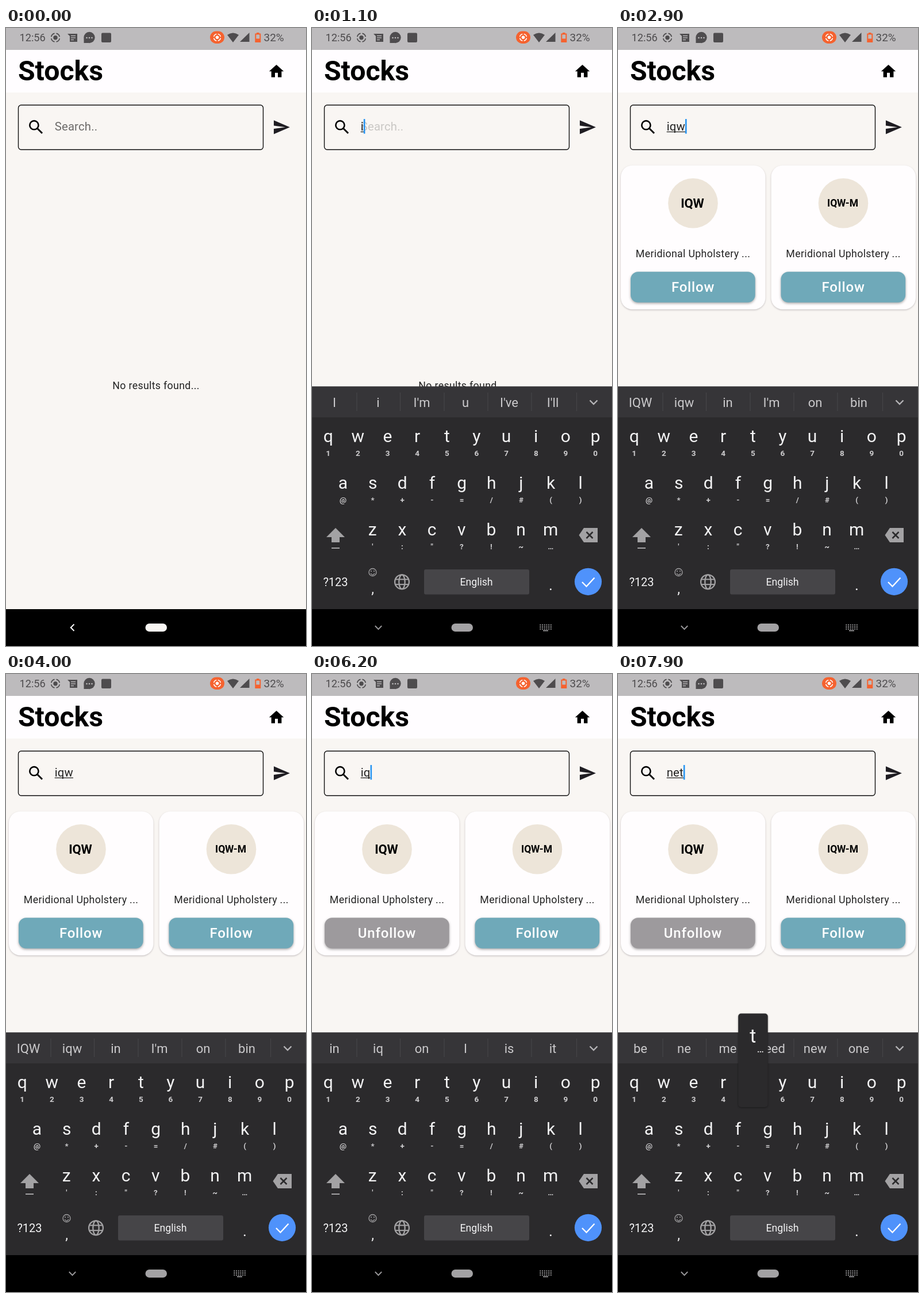
Animation, 522 px wide and 1073 px high, one loop 8000 ms. Source, as an HTML page with a canvas:

```html
<!DOCTYPE html>
<html lang="en">
<head>
<meta charset="utf-8">
<title>Stocks</title>
<style>
html, body { margin: 0; width: 100%; height: 100%; overflow: hidden; background: #f9f6f3; }
canvas { display: block; width: 522px; height: 1073px; }
</style>
</head>
<body>
<canvas id="stage" width="522" height="1073"></canvas>
<script>
const c = document.getElementById('stage').getContext('2d');
const LOOP = 8000, STEP = 100;

// [time, text in the search field]
const edits = [
  [300, ''], [1000, 'i'], [1300, 'iq'], [1500, 'iqw'], [5600, 'iqw'], [6100, 'iq'],
  [6300, 'i'], [6500, ''], [7000, 'n'], [7300, 'ne'], [7900, 'net']
];
const hints = {
  i: ['I', 'i', "I'm", 'u', "I've", "I'll"],
  iq: ['in', 'iq', 'on', 'I', 'is', 'it'],
  iqw: ['IQW', 'iqw', 'in', "I'm", 'on', 'bin'],
  n: ['in', 'n', 'no', 'on', 'not', 'and'],
  ne: ['be', 'ne', 'me', 'need', 'new', 'one']
};
const startHints = [['Limits', 51], ['Lukita', 151], ['Lakota', 254], ['Limitations', 382]];
const rows = [
  { keys: 'qwertyuiop', marks: '1234567890', x: 28.2, y: 710 },
  { keys: 'asdfghjkl', marks: '@*+-=/#()', x: 54, y: 791 },
  { keys: 'zxcvbnm', marks: "':\"?!~…", x: 105.3, y: 872 }
];
const KEY_W = 51.65, PANEL = '#2b2a2c';

const clamp = v => Math.max(0, Math.min(1, v));
const lastEdit = t => edits.filter(e => e[0] <= t).pop() || [0, ''];
const mix = (a, b, p) => `rgb(${a.map((v, i) => Math.round(v + (b[i] - v) * p))})`;

function text(s, x, y, size, color, { weight = 400, align = 'center', spacing = 0 } = {}) {
  c.font = `${weight} ${size}px Roboto, sans-serif`;
  c.letterSpacing = spacing + 'px';
  c.textAlign = align;
  c.fillStyle = color;
  c.fillText(s, x, y);
  return c.measureText(s).width;
}
function box(x, y, w, h, color, r = 0) {
  c.fillStyle = color;
  c.beginPath();
  c.roundRect(x, y, w, h, r);
  c.fill();
}
function disc(x, y, r, color) {
  c.fillStyle = color;
  c.beginPath();
  c.arc(x, y, r, 0, 7);
  c.fill();
}
function ring(x, y, r, color, w, a = 0, b = Math.PI * 2) {
  c.strokeStyle = color;
  c.lineWidth = w;
  c.beginPath();
  c.arc(x, y, r, a, b);
  c.stroke();
}
function trace(pts) {
  c.beginPath();
  pts.forEach(([x, y], i) => i ? c.lineTo(x, y) : c.moveTo(x, y));
}
function line(pts, color, w) {
  trace(pts);
  c.strokeStyle = color;
  c.lineWidth = w;
  c.stroke();
}
function poly(pts, color) {
  trace(pts);
  c.fillStyle = color;
  c.fill();
}
function icon(d, x, y, scale, color) {
  c.save();
  c.translate(x, y);
  c.scale(scale, scale);
  c.fillStyle = color;
  c.fill(new Path2D(d));
  c.restore();
}
function shadow(color, blur, dy) {
  c.shadowColor = color;
  c.shadowBlur = blur;
  c.shadowOffsetY = dy;
}
const noShadow = () => shadow('transparent', 0, 0);

// dot inside a ring of four arcs
function target(x, y, dot, r, color, w) {
  disc(x, y, dot, color);
  for (let i = 0; i < 4; i++) {
    const a = i * Math.PI / 2 + 0.2;
    ring(x, y, r, color, w, a, a + 1.17);
  }
}

function statusBar() {
  const ink = '#4e4c4e', bar = '#bdbbbd', orange = '#f5622f';
  box(0, 0, 522, 38, bar);
  text('12:56', 23.5, 23, 18.2, ink, { align: 'left' });
  target(86, 16.7, 3.7, 7.4, ink, 1.7);
  poly([[107, 10], [124, 10], [124, 24], [111, 24], [111, 14]], ink);
  [13.5, 17, 20.5].forEach((y, i) => box(113, y - 0.7, i < 2 ? 8 : 5, 1.4, bar));
  disc(145, 16.5, 9.7, ink);
  poly([[135.5, 18], [135.5, 26], [144, 26]], ink);
  [-4.5, 0, 4.5].forEach(d => disc(145 + d, 17, 1.3, bar));
  box(166, 8.5, 17, 16.5, ink, 2);

  box(355, 5.5, 25, 21.5, orange, 10.7);
  target(367.5, 16.3, 2.8, 6, '#fff', 1.5);
  c.fillStyle = ink;
  c.beginPath();
  c.moveTo(395, 25);
  c.lineTo(385, 12);
  c.quadraticCurveTo(395, 5, 405, 12);
  c.fill();
  poly([[407, 24], [423.5, 24], [423.5, 8]], ink);
  box(436, 8, 4.5, 3, orange);
  c.strokeStyle = orange;
  c.lineWidth = 2;
  c.strokeRect(434.3, 10.5, 8, 13.5);
  box(434, 18.5, 9, 5.5, orange);
  text('32%', 448.5, 23, 19, ink, { align: 'left' });
}

function header() {
  box(0, 38, 522, 74, '#fffdff');
  text('Stocks', 21, 91, 48.2, '#000', { weight: 700, align: 'left' });
  icon('M10 20v-6h4v6h5v-8h3L12 3 2 12h3v8z', 455.3, 60, 1.27, '#000');
}

function searchField(t) {
  const [time, value] = lastEdit(t);
  c.strokeStyle = '#111';
  c.lineWidth = 1.4;
  c.beginPath();
  c.roundRect(21.5, 133.7, 426, 77.5, 5);
  c.stroke();
  ring(48.9, 168.7, 7.6, '#000', 2.6);
  line([[54.4, 174.2], [63, 182.8]], '#000', 2.9);
  icon('M2.01 21L23 12 2.01 3 2 10l15 2-15 2z', 463.3, 156.3, 1.33, '#1f1d22');

  const type = { align: 'left', spacing: 0.19 };
  let fade = 1;
  if (t >= 1000 && t < 6500) fade = 1 - (t - 1000) / 150;
  else if (t >= 7000) fade = 1 - (t - 7000) / 150;
  else if (t >= 6500) fade = (t - 6400) / 200;
  c.globalAlpha = clamp(fade);
  text('Search..', 84.7, 178, 20.3, '#6d6b6a', type);
  c.globalAlpha = 1;

  const w = text(value, 84.7, 178, 20.3, '#222', type);
  if (value) box(84.7, 179.7, w, 1.3, '#222');
  if (t >= 300 && Math.floor((t - time) / 500) % 2 === 0) box(84.7 + w, 158, 2.6, 25.5, '#2694f2');
}

function card(x, ticker, size, followed) {
  const mid = x + 125.5;
  shadow('rgba(60,50,60,.28)', 3, 1.2);
  box(x, 238.5, 251.5, 250, '#fffdfe', 20);
  noShadow();
  disc(mid, 304.3, 43.3, '#ede5d9');
  text(ticker, mid - 1, 304 + size * 0.355, size, '#000', { weight: 700 });
  text('Meridional Upholstery ...', mid, 397.5, 17.8, '#222', { spacing: 0.32 });
  shadow('rgba(0,0,0,.35)', 4, 1.8);
  box(x + 17, 423.2, 216.7, 53.3, mix([111, 169, 185], [157, 154, 157], followed), 13);
  noShadow();
  text(followed > 0 ? 'Unfollow' : 'Follow', mid, 458.3, 24, '#fff', { weight: 500, spacing: 0.8 });
}

function results(t) {
  if (t < 2700) return text('No results found...', 261, 627, 17.8, '#222', { spacing: 0.32 });
  card(5, 'IQW', 22, clamp((t - 4500) / 200));
  card(266.5, 'IQW-M', 17.5, 0);
}

function hintStrip(t) {
  const words = hints[lastEdit(t - 100)[1]];
  const list = words ? words.map((s, i) => [s, 39 + i * 76]) : startHints;
  const bars = words ? [78, 153.5, 230, 306, 382, 460.5] : [102, 201, 460.5];
  box(0, 622.4, 522, 53.6, '#363538');
  bars.forEach(x => box(x - 0.6, 633, 1.2, 32, '#464548'));
  list.forEach(([s, x]) => text(s, x, 657.7, 22, '#cbcacc'));
  line([[483.5, 646.5], [490, 653], [496.5, 646.5]], '#b5b4b7', 2.4);
}

function keyPopup(t) {
  const [time, value] = lastEdit(t);
  const grew = value.length > lastEdit(time - 1)[1].length;
  if (!grew || t - time >= STEP) return;
  const key = value.slice(-1);
  const row = rows.find(r => r.keys.includes(key));
  const x = row.x + row.keys.indexOf(key) * KEY_W;
  shadow('rgba(0,0,0,.4)', 3, 1);
  box(x - 25.6, row.y - 120.5, 51.5, 162.5, PANEL, 5);
  noShadow();
  text(key, x, row.y - 70, 34, '#f2f2f2');
  text('…', x + 13, row.y - 53, 17, '#e0e0e0', { weight: 500 });
}

function keyboard(t) {
  if (t < 300) return;
  const grey = '#a3a2a4', white = '#f3f3f4';
  const p = clamp((t - 200) / 300);
  c.save();
  c.globalAlpha = clamp(p * 2.1);
  c.translate(0, 144 * (1 - p) ** 2);
  box(0, 622.4, 522, 386.6, PANEL);
  hintStrip(t);
  rows.forEach(r => [...r.keys].forEach((k, i) => {
    const x = r.x + i * KEY_W;
    text(k, x, r.y + 8.5, 30, white);
    text(r.marks[i], x, r.y + 32.5, 13.5, '#cfced0', { weight: 700 });
  }));

  poly([[25, 884], [41, 868], [57, 884], [48, 884], [48, 893], [34, 893], [34, 884]], grey);
  box(34, 902, 14, 2, grey);
  poly([[464.5, 880.5], [473, 868], [497, 868], [497, 893], [473, 893]], grey);
  line([[477.5, 875], [488.5, 886]], PANEL, 2.5);
  line([[488.5, 875], [477.5, 886]], PANEL, 2.5);

  text('?123', 41, 968.7, 20, white);
  ring(105.5, 945, 6.5, grey, 1.3);
  ring(105.5, 946, 3.3, grey, 1.2, 0.2, 2.94);
  disc(103, 943, 1, grey);
  disc(108, 943, 1, grey);
  text(',', 105.5, 982, 24, white);

  ring(156.5, 961.7, 12.4, grey, 2.3);
  c.beginPath();
  c.ellipse(156.5, 961.7, 5.2, 12.4, 0, 0, 7);
  c.stroke();
  [957.3, 966.1].forEach(y => line([[145, y], [168, y]], grey, 2.1));

  box(195, 940, 183, 43.5, '#464548', 3);
  text('English', 286, 968, 17.7, white);
  text('.', 415.5, 976, 26, white);
  disc(480.5, 961.3, 23.6, '#4f92fb');
  line([[470, 962], [477.5, 969.5], [491.5, 954.5]], '#fff', 2.3);
  keyPopup(t);
  c.restore();
}

function navIcons(t) {
  const open = t >= 300, color = open ? '#9b9a9c' : '#fff';
  c.save();
  c.translate(115.5, 1041);
  c.rotate(-Math.PI / 2 * clamp((t - 200) / 290));
  line([[3, -5.7], [-2.8, 0], [3, 5.7]], color, 1.9);
  c.restore();
  box(242.5, 1034, 37.5, 14, open ? '#a3a2a4' : '#f9f6f3', 7);
  if (!open) return;
  for (let i = 0; i < 18; i++) box(396.3 + i % 6 * 3.7, 1035.5 + Math.floor(i / 6) * 3.5, 2, 2, color);
  box(402, 1045.5, 9, 1.8, color);
}

function draw(t) {
  box(0, 0, 522, 1073, '#f9f6f3');
  statusBar();
  header();
  searchField(t);
  results(t);
  box(0, 1009, 522, 64, '#000');
  keyboard(t);
  navIcons(t);
}

function frame(now) {
  draw(Math.floor(now % LOOP / STEP) * STEP);
  requestAnimationFrame(frame);
}
draw(0);
requestAnimationFrame(frame);
</script>
</body>
</html>
```
